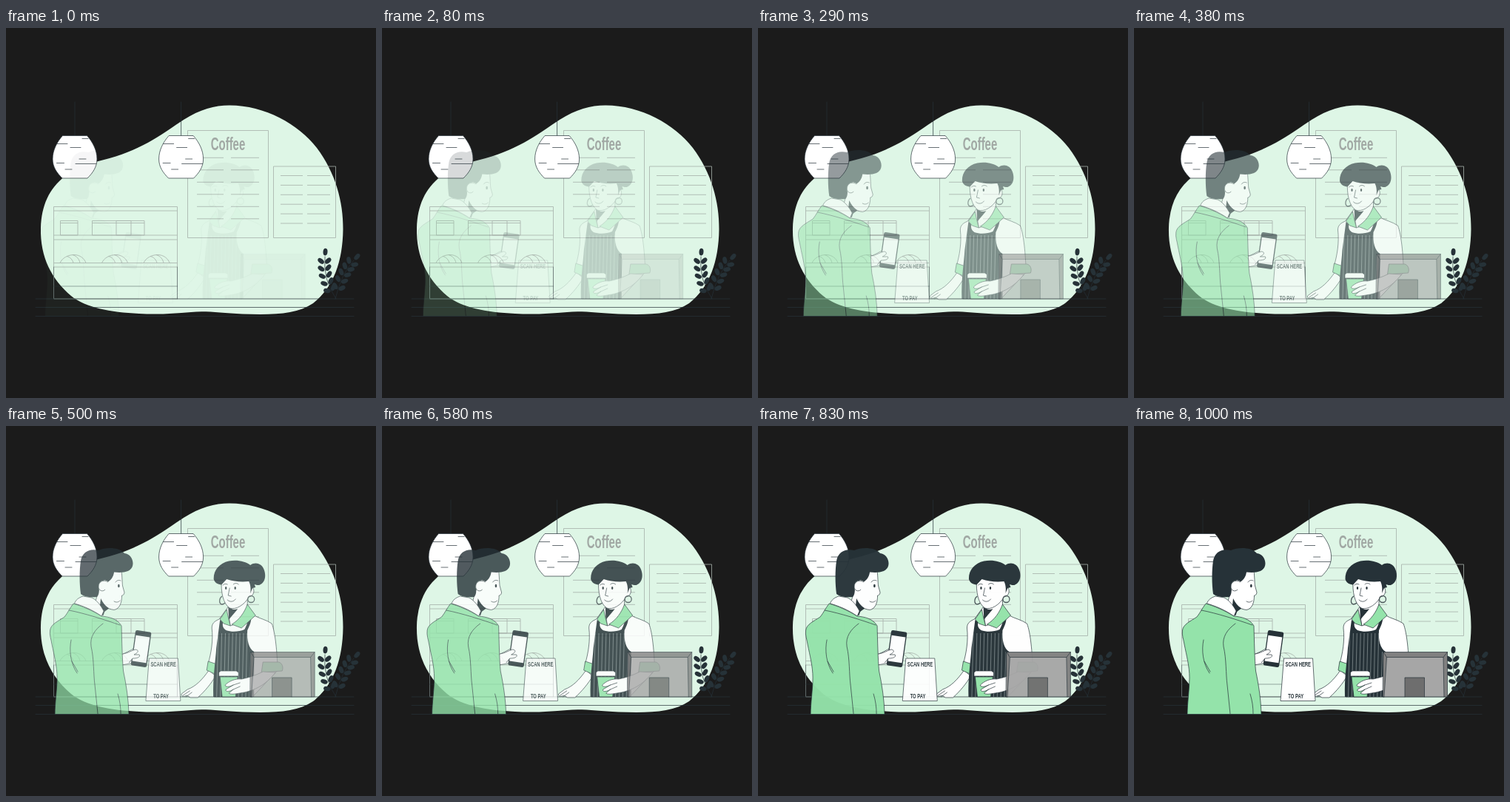
Recreate the animation shown at these times as an HTML page. Size 500 px wide and 500 px high, loop 1.04 s.

```html
<!DOCTYPE html>
<html lang="en">
<head>
<meta charset="utf-8">
<title>Coffee counter</title>
<style>
  html, body { margin: 0; width: 100%; height: 100%; overflow: hidden; background: #1b1b1b; }
  svg { display: block; width: 100vw; height: 100vh; }
  .ink { fill: #263238; }
  .line { fill: none; stroke: #263238; stroke-width: .7; stroke-linecap: round; stroke-linejoin: round; }
  .skin { fill: #fff; stroke: #263238; stroke-width: .7; stroke-linejoin: round; }
  .green { fill: #94e3aa; stroke: #263238; stroke-width: .7; stroke-linejoin: round; }
  .pale { fill: none; stroke: #a6b0aa; stroke-width: .8; }
  text { font: bold 9px "Liberation Sans", Arial, sans-serif; text-anchor: middle; fill: #263238; }
</style>
</head>
<body>
<svg viewBox="0 0 500 500">
  <path fill="#def6e6" d="M47 270C48 240 58 217 80 200C98 187 120 181 140 176C187 163 214 141 240 124C262 110 282 104.500 302 104.500C350 104.500 395 130 420 162C445 195 456 235 455.500 272C455 315 443 350 415 372C393 387 360 388 320 386.500C290 385 270 382 250 384C225 386 205 387.500 180 386C140 384 108 378 88 362C62 340 46 310 47 270Z"/>

  <g class="pale">
    <path d="M245.500 138.500H354.500V283.500H245.500ZM361.500 187H445.500V283.500H361.500Z"/>
    <path id="menu"/>
  </g>
  <text transform="translate(300 165.300) scale(.65 1)" style="font-size:23px;fill:#a1a8a4">Coffee</text>

  <g class="pale">
    <path d="M64.500 241.500H231.500V366H64.500ZM64.500 247H231.500M64.500 280H231.500M64.500 286H231.500M64.500 317.500H231.500M64.500 323H231.500"/>
    <path d="M73.500 260.500H97V280H73.500ZM73.500 263.500H97M116.500 260.500H169V280H116.500ZM149 260.500H187V280H149ZM116.500 263.500H187"/>
    <path id="bread"/>
  </g>
  <path class="line" opacity=".6" d="M64.500 349H231.500M64.500 323V366M231.500 323V366"/>
  <path class="line" d="M40 366H470M40 377.500H470M40 389.500H470"/>

  <g id="lamps"></g>
  <g id="plant" class="ink"></g>

  <g id="customer">
    <path class="skin" d="M143 197L162 195C163 205 163 212 163.500 216L166 225C165.500 228 164 229 162.500 229C162.500 238 160 247 152 248.500C147 248 143 246 141 244L137 256L124 249L130 225Z"/>
    <path class="ink" d="M134 233C137 239 140 243 145 246.500L139 251L137 256L132 251Z"/>
    <path class="skin" d="M110 230C104 232 100 235 98.500 240C110 243 124 249 135 257L138 250C134 242 128 235 122 232Z"/>
    <path class="ink" d="M107 227C105 213 105 195 107 182C109 170 119 165 131 168C140 164 158 163 166 172C174 173 179 181 177 189C175 197 164 199 152 197.500C151 204 148 208 144 210.500C138 206 131 210 131 218C132 223 132 227 129 231C121 232 112 231 107 227Z"/>
    <path class="skin" d="M144 211C138 207 131 210 131 217C131 222 136 225 140 221"/>
    <ellipse class="ink" cx="158.300" cy="216" rx="1.300" ry="2.200"/>
    <path class="line" d="M154 211C156 208 159 208 161 209M152 237C155 239 158 238 160 236"/>
    <path class="skin" d="M161 309C168 307 174 303 180 300L187 304L181 309L187 312L184 318L174 321L162 323Z"/>
    <g transform="translate(188.500 301) rotate(8)">
      <rect class="ink" x="-10.800" y="-24" width="21.600" height="48" rx="2.500"/>
      <rect fill="#fff" x="-9.500" y="-17" width="19" height="35"/>
    </g>
    <path class="skin" d="M164 308C171 307 176 303 181 302C186 303 185 306 179 309L186 309C188 312 184 314 177 314L172 320"/>
    <path class="green" d="M97 240C93 245 89 253 85 258C76 264 66.500 268 65.500 276C64.500 283 67 288 68 295C71 310 75 325 75 340C75 355 72 375 72 389.500H172C171.500 370 168.500 350 164.500 331C163 315 162.500 290 162 270C156 260 145 258 135 257C122 249 108 243 97 240Z"/>
    <path class="line" d="M91 249C112 253 140 262 160 269M137 267C126 275 119 285 121 298C125 315 124 335 126 350L130 389M94 289C91 303 93 321 102 334M95 318L103 332M157 362C160 372 161 380 161 389"/>
  </g>

  <g id="barista">
    <path class="skin" d="M293 261C286 264 283 267 283 273C285 290 282 307 278 321L289 334L286 366H338L372 330C371 305 369 280 364 267C357 262 347 260 340 256L326 243H306Z"/>
    <path class="skin" d="M279 330C270 343 261 352 250 356L242 362C241 366 246 366 249 364L254 367H264C274 358 282 348 288 338Z"/>
    <path class="line" d="M244 364L253 358M248 366L256 360"/>
    <path class="green" d="M278 318L276 330L287 335L290 322Z"/>
    <path class="ink" d="M294 262L298 265C297 270 298 273 302 276C310 279 320 278 327 275C331 268 332 262 332 259L336 257C337 263 334 270 331 276C330 290 333 301 340 305V366H285C284 340 288 317 289 300Z"/>
    <path id="stripes" fill="none" stroke="#b8c3c3" stroke-width=".5"/>
    <path class="skin" d="M308 240L306 258L308 270L320 266L331 250V234Z"/>
    <path class="ink" d="M305 243C309 248 313 249 318 247C313 254 309 257 306 262Z"/>
    <path class="green" d="M303 248L294 261L299 267L308 270L305 258ZM331 241L342 256L323 273L310 268C320 262 327 252 331 241Z"/>
    <path class="skin" d="M296 208C295 224 298 240 307 246C315 249 327 242 333 231C340 230 342 221 337 217L336 205L312 200Z"/>
    <path class="ink" d="M285.500 207C285 195 293 185.500 306 182.500C318 180.500 328 183 335 188C342 183 350 186 353 193C357 202 355 212 347 215C344 215.500 341 214 340.500 214L342 218L338 219L335 226C336 219 335 214 333 210C322 211 312 210 303 207L296 214.500C291 214 287 212 285.500 207Z"/>
    <ellipse class="ink" cx="302" cy="219" rx="1.200" ry="2"/>
    <ellipse class="ink" cx="314.500" cy="219" rx="1.200" ry="2"/>
    <path class="line" d="M298 215C300 213 302 213 304 214M312 214C314 212 317 212 319 214M307 219L305 229L309 230M304 235C308 239 313 237 315 234"/>
    <g fill="none" stroke="#4a5559" stroke-width="1.300">
      <circle cx="336" cy="234" r="4.500"/>
      <path d="M297 230C293 232 292 239 296 241C298 241 300 240 301 239"/>
    </g>
    <path class="green" d="M352 319L373 319C378 320 380 326 378 331L350 333Z"/>
    <path class="green" d="M294 339H318L315 366H297Z"/>
    <path class="skin" d="M292.500 333L295 331H316L319 333V338H292.500Z"/>
    <path class="skin" d="M352 332C342 337 333 340 323 342C314 341 306 345 301 350C301 353 306 353 312 350L302 356C301 359 305 360 312 356L306 361C309 364 319 361 327 360C340 357 355 351 369 333Z"/>
    <path class="line" d="M312 350L321 347M312 356L321 352"/>
  </g>

  <g id="sign">
    <path class="skin" d="M202.500 314H241.500L245 371.500H198Z"/>
    <text transform="translate(221.700 324.700) scale(.65 1)">SCAN HERE</text>
    <text transform="translate(218.700 367.700) scale(.65 1)">TO PAY</text>
  </g>

  <g id="register">
    <path fill="#808080" d="M337 305.500H423.500V366H336.500Z"/>
    <path fill="#a6a6a6" d="M341.500 312.500H418L419 366H337.500Z"/>
    <path fill="#6e6e6e" d="M366 340H392.500V366H366Z"/>
    <path class="line" d="M337 305.500H423.500V366H336.500ZM337 305.500L341.500 312.500H418L423.500 305.500M418 312.500L419 366M341.500 312.500L338 366M366 366V340H392.500V366"/>
  </g>
</svg>
<script>
  const $ = id => document.getElementById(id);
  const range = (n, f) => Array.from({ length: n }, (_, i) => f(i)).join('');

  // Still scenery
  $('menu').setAttribute('d',
    range(6, i => `M258 ${175.3 + i * 16.5}h36m10 0h38`) +
    range(6, i => `M371 ${199.5 + i * 12.9}h30m6 0h31`));
  $('bread').setAttribute('d', range(3, i =>
    `M${73 + i * 56.5} 317.5c3-7 11-11 19-11s14 5 16 11m-26-9c5 1 8 5 9 9m-1-11c6 2 9 6 10 11`));
  $('stripes').setAttribute('d', range(10, i => {
    const x = 290.5 + i * 4.9;
    const top = x < 332 ? 280 : 305;
    return `M${x + 1} ${top}L${x - 1} 366`;
  }));

  $('lamps').innerHTML = range(2, i => `<g transform="translate(${i * 143.6})">
    <path class="line" d="M93 100V146"/>
    <path class="skin" d="M76.500 145.500H109.500C117 154 123 165 123 177C123 188 117 196 110 203H76C69 196 63 188 63 177C63 165 69 154 76.500 145.500Z"/>
    <path class="line" d="M103 149.500h8M69 156.500h14M87 161.500h14M99 177h9M68.500 182.500h10M94 183.500h28M80 191h9"/></g>`);

  // Leaves sit in pairs along a quadratic stem
  function branch(a, b, c, pairs) {
    const at = (k, u) => (1 - u) ** 2 * a[k] + 2 * u * (1 - u) * b[k] + u * u * c[k];
    let out = `<path class="line" d="M${a}Q${b} ${c}"/>`;
    for (let i = 0; i <= pairs; i++) {
      const u = .18 + .82 * i / pairs, x = at(0, u), y = at(1, u);
      const lean = Math.atan2(at(0, u) - at(0, u - .05), at(1, u - .05) - at(1, u)) * 180 / Math.PI;
      const sides = i < pairs ? [-48, 48] : [0];
      for (const s of sides)
        out += `<ellipse cy="-6.500" rx="3" ry="4.900" transform="translate(${x} ${y}) rotate(${lean + s})"/>`;
    }
    return out;
  }
  $('plant').innerHTML =
    branch([446, 366], [428, 340], [431, 309], 5) +
    branch([445, 366], [453, 332], [470, 314], 5);

  // Each part slides in from the left while fading: [id, slide power, fade power]
  const loop = 1040, steps = 25, slide = 20;
  const parts = [['customer', 1.7, 1.8], ['barista', 2, 2], ['sign', 1.1, 1.5], ['register', 1.6, 1.8]];

  function draw(now) {
    const t = now % loop;
    const k = Math.min(steps - 1, Math.floor((t + 5) / (loop / steps)));
    const left = 1 - (k + .5) / (steps - .5);
    for (const [id, move, fade] of parts) {
      const part = $(id);
      part.setAttribute('transform', `translate(${-slide * left ** move})`);
      part.setAttribute('opacity', 1 - left ** fade);
    }
  }

  const start = performance.now();
  function tick() {
    draw(performance.now() - start);
    requestAnimationFrame(tick);
  }
  tick();
</script>
</body>
</html>
```
